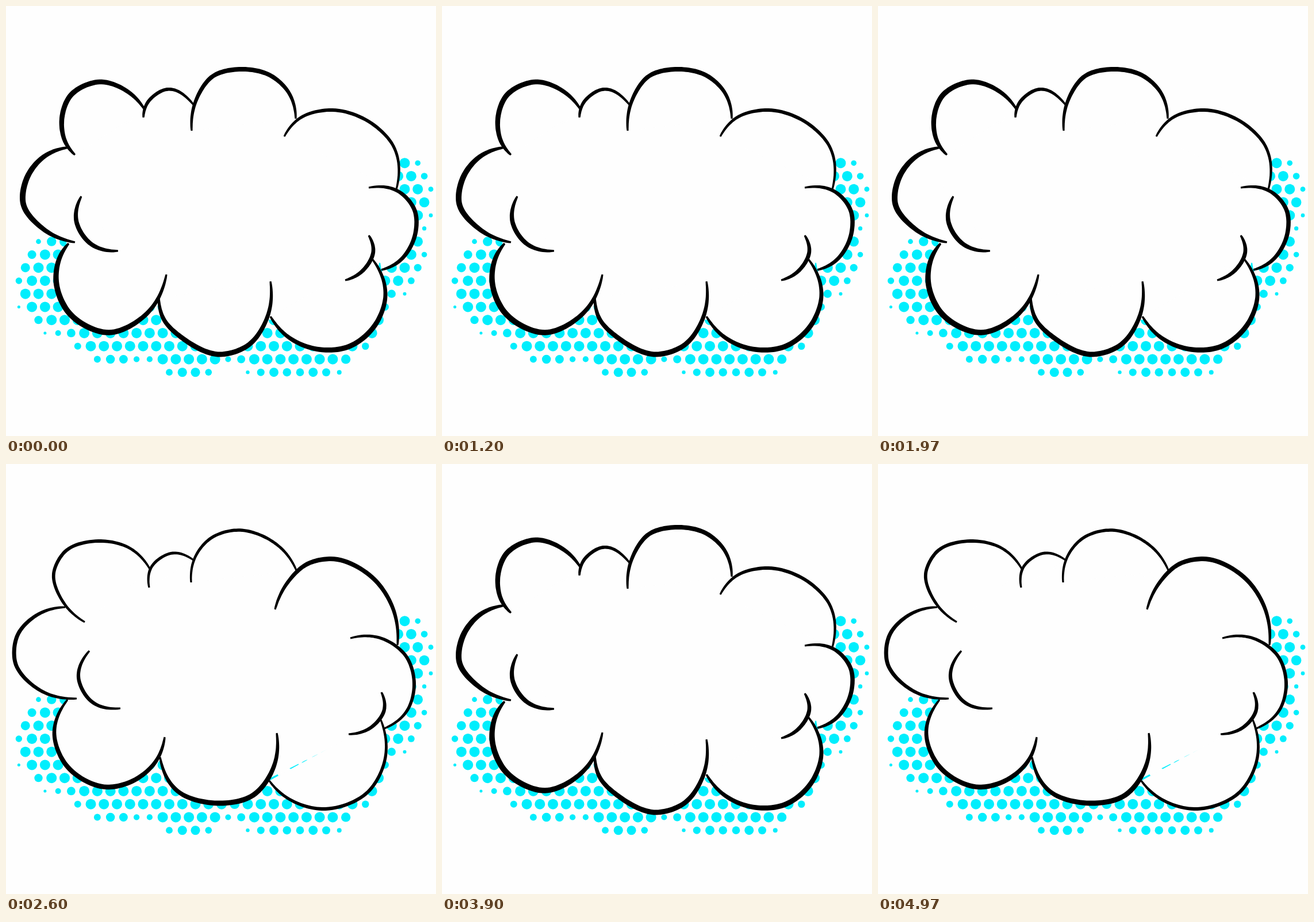
These frames come from a looping animation (748x748 px, 5060 ms). An HTML page:

```html
<!DOCTYPE html>
<html lang="en">
<head>
<meta charset="utf-8">
<title>Wobbling comic cloud</title>
<style>
  html, body { margin: 0; width: 100%; height: 100%; overflow: hidden; background: #fefefe; }
  svg { display: block; width: 100vw; height: 100vh; }
  .dots { fill: #00eefd; }
  .body { fill: #fefefe; }
  .ink { fill: #000; }
</style>
</head>
<body>
<svg viewBox="0 0 748 748"></svg>
<script>
const NS = 'http://www.w3.org/2000/svg';
const svg = document.querySelector('svg');

function add(parent, name, attrs) {
  const el = document.createElementNS(NS, name);
  for (const key in attrs) el.setAttribute(key, attrs[key]);
  return parent.appendChild(el);
}

// Halftone shadow: staggered dots that shrink towards the rim of a few discs (x, y, radius)
const GAP = 22.75;
const discs = [
  [108, 483, 90], [190, 530, 95], [318, 558, 91], [470, 555, 93],
  [535, 555, 93], [573, 522, 93], [645, 335, 96], [632, 420, 98]
];

function drawDots() {
  const group = add(svg, 'g', { class: 'dots' });
  for (let row = 0; row < 17; row++) {
    for (let col = 0; col < 33; col++) {
      const cx = 11 + GAP * (col + (row % 2) / 2);
      const cy = 273.2 + GAP * row;
      const depth = Math.max(...discs.map(([x, y, r]) => r - Math.hypot(cx - x, cy - y)));
      const r = Math.min(9, 4.2 + depth * 0.35);
      if (r > 2.4) add(group, 'circle', { cx, cy, r });
    }
  }
}

// Each stroke: pen weight, then the key points it passes through
const poses = [
  [
    '9 241,180 216,152 163,132 112,156 97,198 104,238 120,259',
    '6 239,194 244,172 280,145 328,174',
    '8 323,217 331,163 360,122 409,110 462,122 492,151 504,196',
    '6 484,227 510,196 562,181 640,207 674,244 679,319',
    '7.5 631,316 685,324 711,356 712,396 680,447 653,459',
    '7 631,399 639,425 621,460 590,477',
    '9 637,440 660,503 642,555 595,593 550,598 490,575 460,540',
    '9 460,479 455,540 420,591 373,606 310,580 272,540 266,508',
    '10 279,467 245,535 179,568 109,533 87,475 95,434 109,413',
    '10 120,411 65,388 30,344 36,300 66,262 109,246',
    '8 131,331 122,372 148,414 195,426'
  ],
  [
    '7 243,181 220,148 175,135 120,155 92,199 105,242 142,277',
    '6 242,209 250,172 280,146 325,167',
    '6.5 321,213 327,161 350,123 390,106 460,122 494,155 505,193',
    '7 473,225 515,188 575,176 640,200 678,256 684,309',
    '8.5 592,312 635,294 695,319 713,375 694,435 646,463',
    '6 639,397 645,420 627,454 596,468',
    '8 638,448 656,513 644,556 604,602 564,609 494,592 464,563 458,541',
    '8 467,495 448,552 418,590 382,599 315,580 275,538 267,485',
    '8 265,503 222,546 180,562 112,532 88,485 88,450 104,417',
    '7 105,414 55,384 20,338 23,300 60,259 109,247',
    '6.5 145,325 122,363 140,408 197,423'
  ],
  [
    '6 251,184 218,148 165,134 102,153 83,190 100,241 137,275',
    '5 249,215 252,181 290,155 326,167',
    '5.5 322,206 330,160 355,130 404,115 450,127 485,153 505,185',
    '8 468,253 490,206 524,174 565,165 640,200 676,260 681,315',
    '6 599,303 645,301 697,336 710,382 697,430 658,460',
    '6.5 653,397 658,427 638,456 596,470',
    '6 652,445 660,510 630,570 550,600 485,578 458,551',
    '9 471,468 466,526 430,576 368,590 295,566 268,510',
    '8.5 276,475 262,515 225,549 176,562 104,523 84,467 107,410',
    '7 123,408 60,394 16,345 20,298 55,262 103,249',
    '6.5 145,325 126,370 150,414 199,425'
  ]
];

const STEPS = 14;

// Slope at the middle of three points, weighted by chord length
function slope(a, b, c) {
  const h = Math.hypot(b.x - a.x, b.y - a.y);
  const k = Math.hypot(c.x - b.x, c.y - b.y);
  const axis = v => ((b[v] - a[v]) * k / h + (c[v] - b[v]) * h / k) / (h + k);
  return { x: axis('x'), y: axis('y') };
}

// Smooth Hermite curve whose pen swells from thin ends to full weight
function sample(stroke) {
  const [weight, ...keys] = stroke.split(' ');
  const pts = keys.map(key => {
    const [x, y] = key.split(',').map(Number);
    return { x, y };
  });
  const last = pts.length - 1;
  const slopes = pts.map((p, i) => i && i < last ? slope(pts[i - 1], p, pts[i + 1]) : null);
  const out = [];
  for (let i = 0; i < last; i++) {
    const a = pts[i], b = pts[i + 1];
    const len = Math.hypot(b.x - a.x, b.y - a.y);
    for (let n = 0; n <= STEPS; n++) {
      const u = n / STEPS;
      const axis = v => {
        const chord = b[v] - a[v];
        let from = slopes[i] && slopes[i][v] * len;
        let to = slopes[i + 1] && slopes[i + 1][v] * len;
        from ??= 2 * chord - to;
        to ??= 2 * chord - from;
        return a[v] + u * (from + u * (3 * chord - 2 * from - to + u * (from + to - 2 * chord)));
      };
      const swell = Math.sin(Math.PI * (i + u) / last) ** 0.6 || 0;
      if (n || !i) out.push({ x: axis('x'), y: axis('y'), w: 3 + (weight - 3) * swell });
    }
  }
  return out;
}

function toPath(pts) {
  return 'M' + pts.map(p => p.x.toFixed(1) + ' ' + p.y.toFixed(1)).join('L') + 'Z';
}

function brush(line) {
  const side = sign => line.map((p, i) => {
    const a = line[Math.max(0, i - 1)];
    const b = line[Math.min(line.length - 1, i + 1)];
    const dx = b.x - a.x, dy = b.y - a.y;
    const k = sign * p.w / 2 / (Math.hypot(dx, dy) || 1);
    return { x: p.x - dy * k, y: p.y + dx * k };
  });
  return toPath([...side(1), ...side(-1).reverse()]);
}

const CORE = 'M115 255L242 187L325 180L503 200L680 318L648 452L460 546L268 515L105 416Z';

function drawPose(strokes) {
  const group = add(svg, 'g', { visibility: 'hidden' });
  const lines = strokes.map(sample);
  add(group, 'path', { class: 'body', d: CORE });
  lines.forEach(line => add(group, 'path', { class: 'body', d: toPath(line) }));
  lines.forEach(line => add(group, 'path', { class: 'ink', d: brush(line) }));
  return group;
}

drawDots();
const clouds = poses.map(drawPose);

// Ten drawings per 1300 ms, switching on multiples of 10 ms
const LOOP = 5060, BAR = 1300;
const starts = Array.from({ length: 10 }, (_, k) => 10 * Math.round(k * 40 / 3));

function render(ms) {
  const t = ms % LOOP;
  const beat = starts.filter(s => s <= t % BAR).length - 1;
  const shown = (10 * Math.floor(t / BAR) + beat) % clouds.length;
  clouds.forEach((g, i) => g.setAttribute('visibility', i === shown ? 'visible' : 'hidden'));
}

const begin = performance.now();
function tick() {
  render(performance.now() - begin);
  requestAnimationFrame(tick);
}
tick();
</script>
</body>
</html>
```
